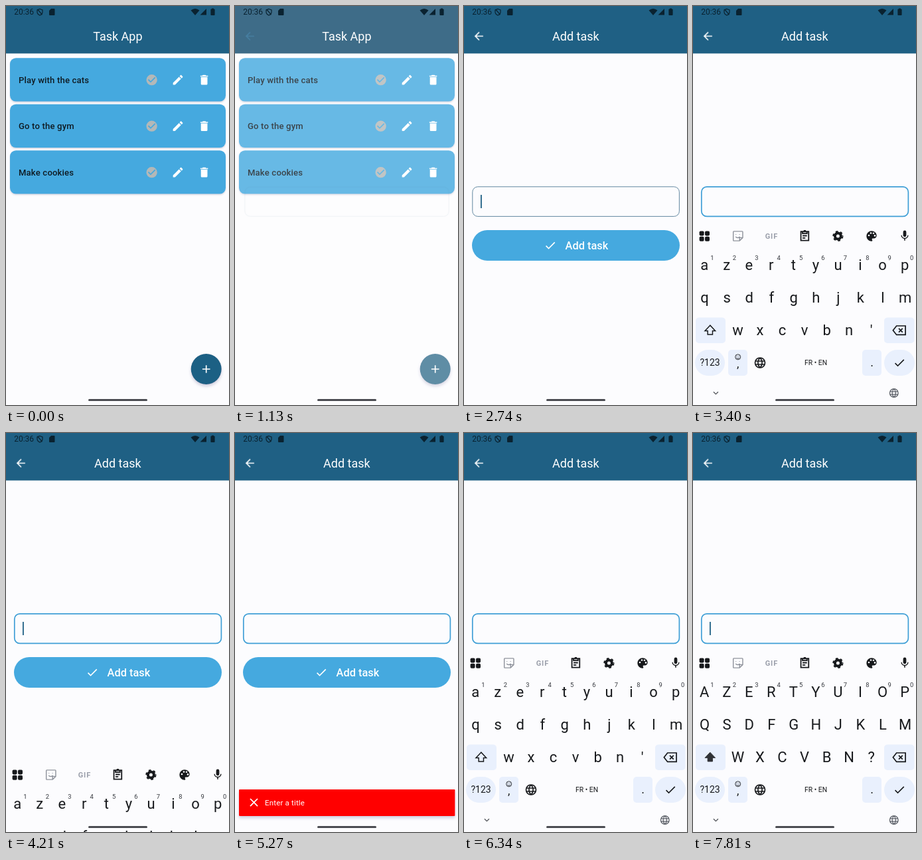
Recreate the animation shown at these times as an HTML page. Size 336 px wide and 600 px high, loop 8000 ms.

```html
<!DOCTYPE html>
<html lang="en">
<head>
<meta charset="utf-8">
<title>Task App</title>
<style>
  html, body { margin: 0; width: 100%; height: 100%; overflow: hidden; background: #fcfcfe; }
  svg { display: block; width: 336px; height: 600px; font-family: Roboto, "Noto Sans", sans-serif; }
  #page { transform-origin: 168px 300px; }
  .mid { text-anchor: middle; }
</style>
</head>
<body>
<svg id="stage" viewBox="0 0 336 600"></svg>
<script>
const LOOP = 8000;
const NAVY = '#1f6084', SKY = '#45a9df', PAPER = '#fcfcfe', INK = '#17191c', GREY = '#8f939c', KEY = '#e9f0fd';
const ICON = {
  back: 'M20 11H7.83l5.59-5.59L12 4l-8 8 8 8 1.41-1.41L7.83 13H20z',
  check: 'M9 16.17L4.83 12l-1.42 1.41L9 19 21 7l-1.41-1.41z',
  done: 'M12 2a10 10 0 1 0 0 20a10 10 0 1 0 0-20zm-2 15l-5-5 1.41-1.41L10 14.17l7.59-7.59L19 8z',
  edit: 'M3 17.25V21h3.75L17.81 9.94l-3.75-3.75zM20.71 7.04c.39-.39.39-1.02 0-1.41l-2.34-2.34c-.39-.39-1.02-.39-1.41 0l-1.83 1.83 3.75 3.75z',
  bin: 'M6 19c0 1.1.9 2 2 2h8c1.1 0 2-.9 2-2V7H6zM19 4h-3.5l-1-1h-5l-1 1H5v2h14z',
  close: 'M19 6.41L17.59 5 12 10.59 6.41 5 5 6.41 10.59 12 5 17.59 6.41 19 12 13.41 17.59 19 19 17.59 13.41 12z',
  plus: 'M19 13h-6v6h-2v-6H5v-2h6V5h2v6h6z',
  palette: 'M12 3a9 9 0 0 0 0 18c.83 0 1.5-.67 1.5-1.5 0-.39-.15-.74-.39-1.01-.23-.26-.38-.61-.38-.99 0-.83.67-1.5 1.5-1.5H16c2.76 0 5-2.24 5-5 0-4.42-4.03-8-9-8z',
  mic: 'M12 14c1.66 0 3-1.34 3-3V5a3 3 0 0 0-6 0v6c0 1.66 1.34 3 3 3zm5.3-3c0 3-2.54 5.1-5.3 5.1S6.7 14 6.7 11H5c0 3.41 2.72 6.23 6 6.72V21h2v-3.28c3.28-.48 6-3.3 6-6.72z',
  shift: 'M12 4L3.5 13H8v6h8v-6h4.5z',
  erase: 'M8 5h14v14H8L2.5 12zM11.5 9l6 6M17.5 9l-6 6',
  globe: 'M3 12a9 9 0 1 0 18 0a9 9 0 1 0-18 0M3.6 9h16.8M3.6 15h16.8M12 3c-5 5-5 13 0 18M12 3c5 5 5 13 0 18',
  board: 'M5 4.5h14v16H5zM8 4.5V8h8V4.5M8 12h8M8 16h5M10 3h4',
  sticker: 'M4 3h16a1 1 0 0 1 1 1v11l-6 6H4a1 1 0 0 1-1-1V4a1 1 0 0 1 1-1zM21 15h-6v6M8 8.5v1M15 8.5v1M7.5 13c2 3 6 3 8 0',
  down: 'M6 9l6 6 6-6'
};

const rect = (x, y, w, h, r, fill, more = '') =>
  `<rect x="${x}" y="${y}" width="${w}" height="${h}" rx="${r}" fill="${fill}" ${more}/>`;
const text = (s, x, y, size, fill, more = '') =>
  `<text x="${x}" y="${y}" font-size="${size}" fill="${fill}" ${more}>${s}</text>`;
const place = (cx, cy, size) =>
  `transform="translate(${cx - size / 2} ${cy - size / 2}) scale(${size / 24})"`;
const icon = (name, cx, cy, fill, size = 19.6, more = '') =>
  `<path d="${ICON[name]}" ${place(cx, cy, size)} fill="${fill}" ${more}/>`;
const line = (name, cx, cy, color, size = 19.6, weight = 1.8) =>
  icon(name, cx, cy, 'none', size, `stroke="${color}" stroke-width="${weight}"`);
const group = (id, body, more = '') => `<g id="${id}" ${more}>${body}</g>`;

function card(title, i) {
  const y = 78.2 + i * 69.5, mid = y + 33;
  return rect(6, y, 325, 65.4, 9, SKY, 'filter="url(#soft)"') +
    text(title, 19, mid + 4.7, 13.08, '#0f1b23', 'font-weight="500" letter-spacing=".17"') +
    icon('done', 219.6, mid, '#b3b8b8') + icon('edit', 259, mid, '#fff') + icon('bin', 298.6, mid, '#fff');
}

function status() {
  const c = '#0a2230';
  return text('20:36', 12.2, 13.2, 12, c) +
    `<path d="M51 4.5l4 1.5v3c0 2.5-1.6 4-4 5c-2.4-1-4-2.5-4-5V6zM47.5 5l7 8" fill="none" stroke="${c}" stroke-width="1.2"/>` +
    `<path d="M68 4h4.5a1 1 0 0 1 1 1v8a1 1 0 0 1-1 1h-6.5a1 1 0 0 1-1-1V7z` +
    `M278.5 6.5q6.5-5 13 0L285 14zM302 4v9.5h-9.5z" fill="${c}"/>` +
    rect(310, 3.6, 3, 2, 0, c) + rect(308.4, 4.6, 6.2, 9.4, 1, c);
}

const ROWS = [['azertyuiop', 17.2, 397.2], ['qsdfghjklm', 17.6, 445.8], ["wxcvbn'", 67.4, 494.8]];
function letters(upper) {
  return ROWS.map(([row, x, y]) => [...row].map((ch, i) => {
    const s = upper ? (ch === "'" ? '?' : ch.toUpperCase()) : ch;
    return text(s, x + i * 33.55, y, 22, INK, 'class="mid"');
  }).join('')).join('');
}

function keyboard() {
  const digits = [...'1234567890'].map((d, i) =>
    text(d, 29 + i * 33.4, 381.5, 9.4, '#33363c', 'class="mid"')).join('');
  const apps = [[9.6, 338.4], [18, 338.4], [9.6, 346.8], [18, 346.8]]
    .map(([x, y]) => rect(x, y, 7, 7, 1.8, INK)).join('');
  const dots = [[265, 345], [268, 341.5], [272, 341.8], [274, 345.4]]
    .map(([x, y]) => `<circle cx="${x}" cy="${y}" r="1.3" fill="${PAPER}"/>`).join('');
  const gear = `<circle cx="218.4" cy="346" r="4.5" fill="none" stroke="${INK}" stroke-width="4"/>` +
    `<circle cx="218.4" cy="346" r="6.9" fill="none" stroke="${INK}" stroke-width="2.4" pathLength="12" stroke-dasharray="1 1"/>`;
  const face = `<circle cx="67.7" cy="527.8" r="4" fill="none" stroke="${INK}" stroke-width=".9"/>` +
    `<path d="M66.2 526v1M69.2 526v1M65.5 529q2.2 2.5 4.4 0" fill="none" stroke="${INK}" stroke-width=".9"/>`;
  return rect(0, 322, 336, 278, 0, PAPER) +
    apps + line('sticker', 67.8, 346, GREY, 19) +
    text('GIF', 118.5, 350, 11, '#9a9eaa', 'class="mid" font-weight="700" letter-spacing="1"') +
    line('board', 168.4, 345.5, INK, 20, 2.2) + gear + icon('palette', 269, 346, INK, 20.5) + dots +
    icon('mic', 319, 345.5, INK, 19) + digits +
    rect(4, 468.5, 45, 38.5, 5, KEY) + rect(288, 468.5, 45.5, 38.5, 5, KEY) +
    line('erase', 310.5, 487.7, INK, 23, 1.8) +
    group('lower', letters(false) + line('shift', 25.8, 487.5, INK, 22, 1.6)) +
    group('upper', letters(true) + icon('shift', 25.8, 487.5, '#303236', 22, 'stroke="#303236"')) +
    rect(3, 517, 45, 39, 19.5, KEY) + text('?123', 25.6, 541, 14, INK, 'class="mid"') +
    rect(53, 517, 29, 39, 5, KEY) + face + text(',', 67.7, 544, 17, INK, 'class="mid"') +
    line('globe', 101, 536.5, INK, 20, 2) +
    text('FR • EN', 185, 540, 10.4, INK, 'class="mid"') +
    rect(255, 517, 29, 39, 5, KEY) + text('.', 269.5, 542, 18, INK, 'class="mid"') +
    rect(288, 517, 46, 39, 19.5, KEY) + icon('check', 311, 536.5, INK, 19.6) +
    line('down', 34.4, 582, '#4c4f55', 14, 2) + line('globe', 302.8, 582, '#5c6068', 17, 1.8);
}

const field = (id, stroke, width) =>
  rect(12.8, 271.8, 311.6, 44.6, 8, 'none', `id="${id}" stroke="${stroke}" stroke-width="${width}"`);

document.getElementById('stage').innerHTML =
  `<defs><filter id="soft" x="-10%" y="-20%" width="120%" height="150%">
    <feDropShadow dx="0" dy="1.3" stdDeviation="1.1" flood-color="#8d8ca6" flood-opacity=".4"/></filter>
  <filter id="lift" x="-20%" y="-20%" width="140%" height="150%">
    <feDropShadow dx="0" dy="3" stdDeviation="2" flood-color="#9a98b8" flood-opacity=".45"/></filter></defs>` +
  rect(0, 0, 336, 600, 0, PAPER) +
  ['Play with the cats', 'Go to the gym', 'Make cookies'].map(card).join('') +
  `<circle id="fab" cx="301.7" cy="546" r="23" fill="${NAVY}" filter="url(#lift)"/>` + icon('plus', 301.7, 546, '#fff', 20) +
  rect(0, 71, 336, 529, 0, PAPER, 'id="veil"') +
  group('page',
    group('outline', field('idle', '#6388a0', 1) + field('focus', '#3f9fd6', 1.7)) +
    group('button', rect(12, 337, 313, 46, 23, SKY) + icon('check', 130, 360, '#fff') +
      text('Add task', 152.6, 365.8, 16.35, '#fff', 'font-weight="500"'))) +
  rect(25, 284, 1.8, 20, 0, NAVY, 'id="caret"') +
  group('snack', rect(6, 536, 325.5, 40, 1, '#f00', 'filter="url(#lift)"') + icon('close', 28.5, 555.5, '#fff', 21) +
    text('Enter a title', 45, 559.5, 11.45, '#fff', 'letter-spacing=".2"')) +
  group('keys', keyboard()) +
  rect(0, 0, 336, 71.4, 0, NAVY, 'id="bar"') + status() +
  text('Task App', 168.4, 51.6, 18, '#fff', 'id="home" class="mid"') +
  text('Add task', 168.4, 51.6, 18, '#fff', 'id="add" class="mid"') +
  icon('back', 22.3, 45.3, '#fff', 19.6, 'id="back"') +
  rect(124, 591, 89, 3, 1.5, '#4b4c52');

// steps: [ms, value, easing towards the next step]
function play(id, prop, steps) {
  const all = [...steps];
  if (all[0][0] > 0) all.unshift([0, all[0][1]]);
  const last = all[all.length - 1];
  if (last[0] < LOOP) all.push([LOOP, last[1]]);
  document.getElementById(id).animate(
    all.map(([ms, value, easing = 'linear']) => ({ offset: ms / LOOP, [prop]: value, easing })),
    { duration: LOOP, iterations: Infinity });
}
const hold = (id, steps) => play(id, 'opacity', steps.map(([ms, v]) => [ms, v, 'steps(1, end)']));

// page change
play('veil', 'opacity', [[930, 0], [1130, .18], [1340, 1]]);
play('fab', 'fill', [[930, NAVY], [1130, '#3a7391']]);
play('bar', 'fill', [[930, NAVY], [1130, '#3e6c88'], [1400, NAVY]]);
play('home', 'opacity', [[1140, 1], [1280, 0]]);
play('add', 'opacity', [[1200, 0], [1360, 1]]);
play('back', 'opacity', [[930, 0], [1130, .5], [1340, 1]]);
play('back', 'fill', [[1130, '#4f93bd'], [1340, '#ffffff']]);
play('outline', 'opacity', [[930, 0], [1130, .1], [1400, 1]]);
play('button', 'opacity', [[1150, 0], [1400, 1]]);
play('page', 'transform', [[930, 'scale(.97)'], [1130, 'scale(.987)'], [1400, 'scale(1)']]);

// focus
play('idle', 'opacity', [[2760, 1], [2920, 0]]);
play('focus', 'opacity', [[2760, 0], [2920, 1]]);
hold('caret', [[0, 0], [2740, 1], [3240, 0], [3740, 1], [4240, 0], [4740, 1], [5270, 0],
  [5680, 1], [6210, 0], [6740, 1], [7280, 0], [7810, 1]]);

// keyboard and message
const UP = 'translateY(0px)', DOWN = 'translateY(280px)', OUT = 'cubic-bezier(.2, 0, .1, 1)', IN = 'cubic-bezier(.4, 0, 1, 1)';
play('keys', 'transform', [[2880, DOWN, OUT], [3320, UP], [4000, UP, IN], [4290, DOWN], [5700, DOWN, OUT], [6180, UP]]);
hold('lower', [[0, 1], [6680, 0]]);
hold('upper', [[0, 0], [6680, 1]]);
play('snack', 'transform', [[4080, 'translateY(70px)', OUT], [4400, UP]]);
hold('snack', [[0, 0], [4080, 1]]);
</script>
</body>
</html>
```
